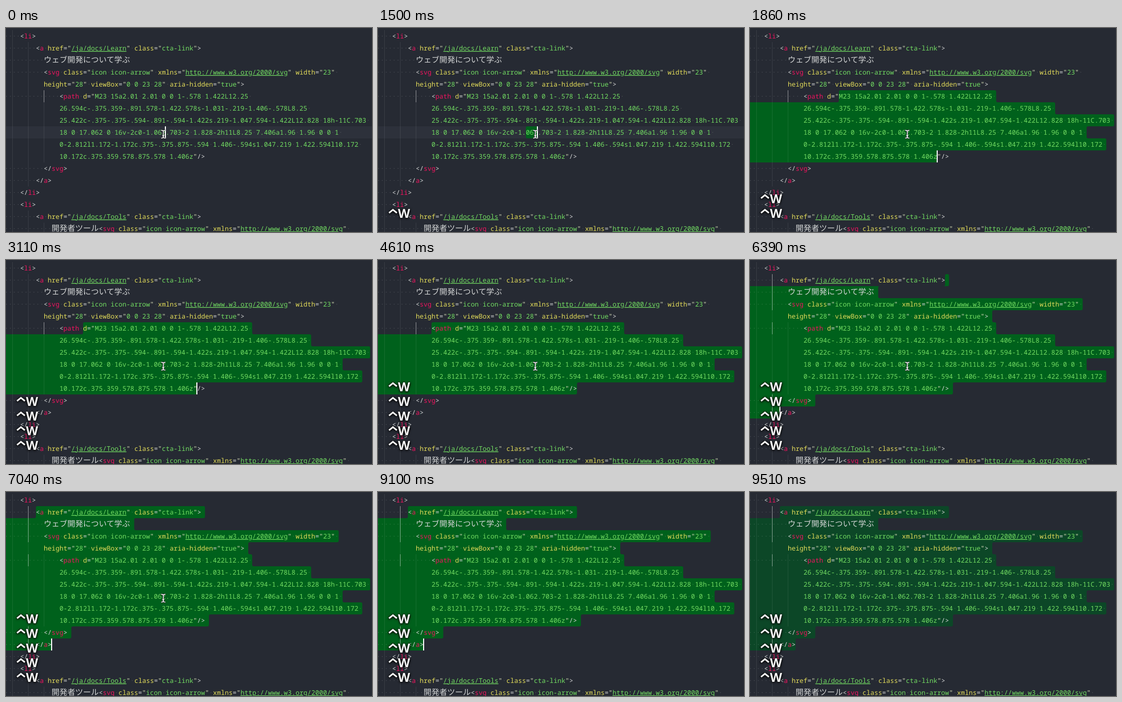
Recreate the animation shown at these times as an HTML page. Size 698 px wide and 390 px high, loop 9610 ms.

```html
<!DOCTYPE html>
<html lang="ja">
<head>
<meta charset="utf-8">
<title>Expand selection</title>
<style>
html, body { margin: 0; width: 100%; height: 100%; overflow: hidden; background: #262a33; }
svg { display: block; }
text { white-space: pre; text-rendering: geometricPrecision; }
#code text { font: 12.5px "Noto Sans Mono", monospace; fill: #d4d6d6; }
#code .jp { font: 15px "Noto Sans CJK JP", "Noto Sans CJK", sans-serif; }
#code .tag { fill: #f0145f; }
#code .attr { fill: #e3dc5a; }
#code .str { fill: #72dc62; }
#code .quote { fill: #d2d8b4; }
.link { text-decoration: underline; text-underline-offset: 2px; }
.dot { fill: #fff; opacity: .17; }
.guide { fill: #fff; opacity: .09; }
.guide.active { opacity: .5; }
.keys { filter: drop-shadow(0 0 1px #000) drop-shadow(0 1px 2px #000); }
.keys text { font: bold 24px "Open Sans", sans-serif; fill: #f4f4f4; }
.keys path { fill: none; stroke: #f4f4f4; stroke-width: 3; }
#mouse path { fill: none; stroke: #fff; stroke-width: 1.5; }
#mouse path:first-child { stroke: #15171c; stroke-width: 3; }
</style>
</head>
<body>
<svg width="698" height="390" viewBox="0 0 698 390">
  <rect id="line" y="188" width="698" height="23" fill="#2d313b"/>
  <path id="sel"/>
  <g id="guides"></g>
  <g id="code"></g>
  <rect id="caret" width="2" height="23" fill="#fff"/>
  <g id="keys"></g>
  <g id="mouse"></g>
</svg>
<script>
const LOOP = 9610, COL = 7.5, ROW = 23, LEFT = -5;
const $ = id => document.getElementById(id);
const rowTop = r => 4 + r * ROW;

// [x, text, soft-wrapped continuation]
const rows = [
  [27, '<li>'],
  [57, '<a href="/ja/docs/Learn" class="cta-link">'],
  [72, 'ウェブ開発について学ぶ'],
  [72, '<svg class="icon icon-arrow" xmlns="http://www.w3.org/2000/svg" width="23" '],
  [72, 'height="28" viewBox="0 0 23 28" aria-hidden="true">', true],
  [102, '<path d="M23 15a2.01 2.01 0 0 1-.578 1.422L12.25 '],
  [102, '26.594c-.375.359-.891.578-1.422.578s-1.031-.219-1.406-.578L8.25 ', true],
  [102, '25.422c-.375-.375-.594-.891-.594-1.422s.219-1.047.594-1.422L12.828 18h-11C.703 ', true],
  [102, '18 0 17.062 0 16v-2c0-1.062.703-2 1.828-2h11L8.25 7.406a1.96 1.96 0 0 1 ', true],
  [102, '0-2.812l1.172-1.172c.375-.375.875-.594 1.406-.594s1.047.219 1.422.594l10.172 ', true],
  [102, '10.172c.375.359.578.875.578 1.406z"/>', true],
  [72, '</svg>'],
  [57, '</a>'],
  [27, '</li>'],
  [27, '<li>'],
  [57, '<a href="/ja/docs/Tools" class="cta-link">'],
  [87, '開発者ツール<svg class="icon icon-arrow" xmlns="http://www.w3.org/2000/svg" ']
];

// [time, start row, start x, caret row, caret x]
const selections = [
  [0, 8, 304.5, 8, 304.5],
  [1500, 8, 282, 8, 304.5],
  [1860, 5, 169.5, 10, 357],
  [2750, 5, 162, 10, 364.5],
  [3110, 5, 147, 10, 364.5],
  [3470, 5, 139.5, 10, 364.5],
  [4130, 5, 102, 10, 379.5],
  [4730, 5, LEFT, 10, 379.5],
  [5080, 4, 454.5, 11, 72],
  [5430, 3, 72, 11, 117],
  [5910, 3, LEFT, 11, 117],
  [6390, 1, 372, 12, 57],
  [7040, 1, 57, 12, 87]
];
const caretOff = [[360, 840], [1320, 1500], [2340, 2750], [4010, 4130], [4610, 4780],
  [6860, 7040], [7480, 8020], [8500, 8970], [9510, LOOP]];
const keyTimes = [1500, 1860, 2750, 3110, 3470];
const BLUR = 9510;

const isWide = ch => ch.charCodeAt(0) > 255;
const colsOf = s => [...s].reduce((n, ch) => n + (isWide(ch) ? 2 : 1), 0);
const esc = s => s.replace(/</g, '&lt;').replace(/>/g, '&gt;');
const span = (cls, s) => `<tspan class="${cls}">${esc(s)}</tspan>`;

// Words outside quotes: tag names, attribute names, Japanese, punctuation
function markup(s) {
  return s.replace(/(<\/?)([a-z]+)|([\w-]+)(?==)|([^\x00-\x7f]+)|[<>]/g,
    (all, open, tag, attr, jp) =>
      tag ? esc(open) + span('tag', tag) : attr ? span('attr', attr) : jp ? span('jp', jp) : esc(all));
}

let quoted = false;
function highlight(s) {
  return s.split('"').map((part, i) => {
    let out = '';
    if (i) { quoted = !quoted; out = span('quote', '"'); }
    if (!part) return out;
    return out + (quoted ? span(/^(\/|http)/.test(part) ? 'str link' : 'str', part) : markup(part));
  }).join('');
}

function dots([x, text, wrapped], r) {
  const at = [];
  if (!wrapped) for (let i = x - COL; i > -COL; i -= COL) at.push(i);
  let cx = x;
  for (const ch of text) {
    if (ch === ' ') at.push(cx);
    cx += isWide(ch) ? 2 * COL : COL;
  }
  return at.map(p => `<circle class="dot" cx="${p + COL / 2}" cy="${rowTop(r) + 11.5}" r=".8"/>`).join('');
}

$('code').innerHTML = rows.map((row, r) =>
  dots(row, r) + `<text x="${row[0]}" y="${rowTop(r) + 16}">${highlight(row[1])}</text>`).join('');

$('guides').innerHTML = rows.map(([x], r) =>
  [12, 42, 72].filter(g => g < x).map(g =>
    `<rect class="guide" data-x="${g}" data-row="${r}" x="${g}" y="${rowTop(r)}" width="1" height="${ROW}"/>`
  ).join('')).join('');

$('keys').innerHTML = keyTimes.map(() =>
  '<g class="keys"><path d="M21 353.5L28.5 347.5L36 353.5"/><text x="38" y="363">W</text></g>').join('');

const beam = 'M-4-7.5Q0-7.5 0-5V5Q0 7.5-4 7.5M4-7.5Q0-7.5 0-5M0 5Q0 7.5 4 7.5M-2 3H2';
$('mouse').innerHTML = `<path d="${beam}"/>`.repeat(2);

// Right edge of each fully selected row, including its line break
const ends = rows.map(([x, text]) =>
  x + colsOf(text) * COL + (text.endsWith(' ') ? 0 : COL));

function roundedPath(points, radius) {
  const pts = points.filter((p, i) => {
    const q = points[(i + 1) % points.length];
    return p[0] !== q[0] || p[1] !== q[1];
  });
  const toward = (p, q) => {
    const len = Math.hypot(q[0] - p[0], q[1] - p[1]);
    const k = Math.min(radius, len / 2) / len;
    return [p[0] + (q[0] - p[0]) * k, p[1] + (q[1] - p[1]) * k];
  };
  return pts.map((p, i) => {
    const a = toward(p, pts[(i + pts.length - 1) % pts.length]);
    const b = toward(p, pts[(i + 1) % pts.length]);
    return `${i ? 'L' : 'M'}${a}Q${p} ${b}`;
  }).join('') + 'Z';
}

function selectionPath([, r0, x0, r1, x1]) {
  if (r0 === r1 && x0 === x1) return '';
  const right = [], left = [];
  for (let r = r0; r <= r1; r++) {
    const a = r === r0 ? x0 : LEFT, b = r === r1 ? x1 : ends[r];
    const y = rowTop(r);
    right.push([b, y], [b, y + ROW]);
    left.unshift([a, y + ROW], [a, y]);
  }
  return roundedPath([...right, ...left], 3);
}
const paths = selections.map(selectionPath);

// Number of steps done, the first at start and the last at end
const stepsDone = (t, start, end, n) =>
  t < start ? 0 : Math.min(n, 1 + Math.floor((t - start) / (end - start) * (n - 1)));

function moveMouse(t) {
  const a = stepsDone(t, 8440, 8610, 4), b = stepsDone(t, 8790, 9100, 6);
  const x = 300 + a * 43.5 + b * 36.6, y = 203 + a * 32 + b * 10.4;
  $('mouse').setAttribute('transform', `translate(${x} ${y})`);
  $('mouse').style.display = b === 6 ? 'none' : '';
}

function draw(t) {
  let i = selections.length - 1;
  while (selections[i][0] > t) i--;
  const [, , , row, x] = selections[i];

  $('sel').setAttribute('d', paths[i]);
  $('sel').setAttribute('fill', t < BLUR ? '#00611c' : '#0c4727');
  $('line').style.display = t < 1860 ? '' : 'none';

  $('caret').setAttribute('x', Math.floor(x - 1));
  $('caret').setAttribute('y', rowTop(row));
  $('caret').style.display = caretOff.some(([a, b]) => t >= a && t < b) ? 'none' : '';

  const activeX = t < 5140 ? 72 : 42;
  for (const g of $('guides').children) {
    const r = +g.dataset.row;
    g.classList.toggle('active', +g.dataset.x === activeX && r < 13 && !rows[r][2]);
  }

  const shown = keyTimes.filter(k => k <= t).length;
  [...$('keys').children].forEach((g, k) => {
    g.setAttribute('transform', `translate(0 ${-28 * k})`);
    g.style.display = k < shown ? '' : 'none';
  });
  moveMouse(t);
}

const began = performance.now();
function tick() {
  draw((performance.now() - began) % LOOP);
  requestAnimationFrame(tick);
}
tick();
</script>
</body>
</html>
```
